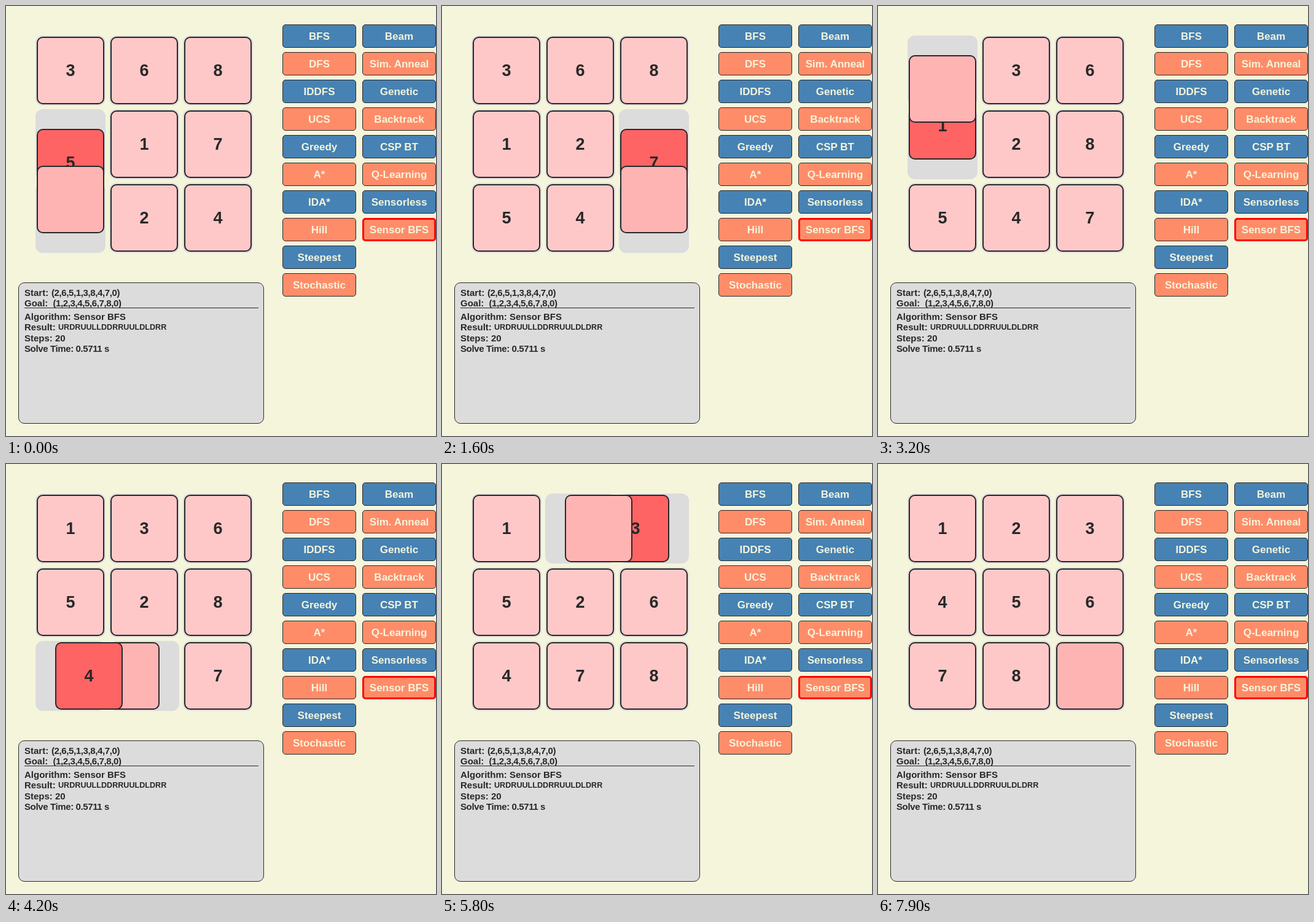
An HTML page for the animation above (8000 ms loop, 700 px wide and 700 px high).

```html
<!DOCTYPE html>
<html lang="en">
<head>
<meta charset="utf-8">
<title>Sliding puzzle solver</title>
<style>
  html, body { margin: 0; width: 100%; height: 100%; overflow: hidden; background: #f5f5dc; }
  svg { display: block; width: 100vw; height: 100vh; }
  text { font: bold 15px "Liberation Sans", Arial, sans-serif; fill: #282828; white-space: pre; }
  .slot { fill: #dcdcdc; }
  .panel { fill: #dcdcdc; stroke: #282828; }
  .tile rect { fill: #ffc8c8; stroke: #282828; stroke-width: 2; }
  .tile.moving rect { fill: #ff6464; }
  .tile.blank rect { fill: #ffb4b4; }
  .tile text { font-size: 27px; text-anchor: middle; }
  .button rect { fill: #4682b4; stroke: #282828; }
  .button.warm rect { fill: #ff8c69; }
  .button.active rect { stroke: #f00; stroke-width: 3; }
  .button text { font-size: 17px; text-anchor: middle; fill: #f5f5dc; }
  .tight { letter-spacing: -.38px; }
  .path { font-size: 12.6px; }
</style>
</head>
<body>
<svg viewBox="0 0 700 700">
  <g id="slots"></g>
  <g id="tiles"></g>
  <g id="buttons"></g>
  <rect class="panel" x="20.5" y="450.5" width="399" height="229" rx="9.5"/>
  <path d="M30 491.5H411" stroke="#282828"/>
  <text x="30" y="472">Start:</text>
  <text class="tight" x="74" y="472">(2,6,5,1,3,8,4,7,0)</text>
  <text x="30" y="489">Goal:</text>
  <text class="tight" x="76.5" y="489">(1,2,3,4,5,6,7,8,0)</text>
  <text x="30" y="511">Algorithm: Sensor BFS</text>
  <text x="30" y="528">Result:</text>
  <text class="path" x="85" y="527">URDRUULLDDRRUULDLDRR</text>
  <text x="30" y="546">Steps: 20</text>
  <text class="tight" x="30" y="563">Solve Time: 0.5711 s</text>
</svg>
<script>
const MOVES = "URDRUULLDDRRUULDLDRR";
const SHIFT = { U: -3, D: 3, L: -1, R: 1 };
const FRAME = 100, STEPS = 4;
const COLUMNS = [
  ["BFS", "DFS", "IDDFS", "UCS", "Greedy", "A*", "IDA*", "Hill", "Steepest", "Stochastic"],
  ["Beam", "Sim. Anneal", "Genetic", "Backtrack", "CSP BT", "Q-Learning", "Sensorless", "Sensor BFS"]
];

const byId = id => document.getElementById(id);

function add(parent, name, attrs, text) {
  const el = document.createElementNS("http://www.w3.org/2000/svg", name);
  for (const key in attrs) el.setAttribute(key, attrs[key]);
  if (text) el.textContent = text;
  parent.appendChild(el);
  return el;
}

function box(parent, x, y, width, height, rx, line = 0) {
  return add(parent, "rect", {
    x: x + line / 2, y: y + line / 2,
    width: width - line, height: height - line, rx: rx - line / 2
  });
}

const cellX = i => 50 + 120 * (i % 3);
const cellY = i => 50 + 120 * Math.floor(i / 3);

for (let i = 0; i < 9; i++) {
  box(byId("slots"), cellX(i) - 2, cellY(i) - 2, 114, 114, 12).setAttribute("class", "slot");
}

COLUMNS.forEach((names, col) => names.forEach((name, row) => {
  const active = name === "Sensor BFS";
  const x = 450 + 130 * col, y = 30 + 45 * row;
  const g = add(byId("buttons"), "g", {
    class: "button" + (row % 2 ? " warm" : "") + (active ? " active" : "")
  });
  box(g, x, y, 120, 38, 5, active ? 3 : 1);
  add(g, "text", { x: x + 60, y: y + 25 }, name);
}));

const layer = byId("tiles");
const tiles = Array.from({ length: 9 }, (_, n) => {
  const g = add(layer, "g", {});
  box(g, 0, 0, 110, 110, 10, 2);
  if (n) add(g, "text", { x: 55, y: 64 }, String(n));
  return g;
});

// boards[k] is the layout before move k
const boards = [[3, 6, 8, 5, 1, 7, 0, 2, 4]];
for (const move of MOVES) {
  const next = boards[boards.length - 1].slice();
  const from = next.indexOf(0), to = from + SHIFT[move];
  next[from] = next[to];
  next[to] = 0;
  boards.push(next);
}

function place(n, from, to, t) {
  const x = cellX(from) + (cellX(to) - cellX(from)) * t;
  const y = cellY(from) + (cellY(to) - cellY(from)) * t;
  tiles[n].setAttribute("transform", `translate(${x} ${y})`);
}

function draw(frame) {
  const k = Math.floor(frame / STEPS);
  const t = (frame % STEPS + 1) / STEPS;
  const board = boards[k], next = boards[k + 1];
  const moved = board[next.indexOf(0)];
  board.forEach((n, i) => {
    place(n, i, next.indexOf(n), t);
    const kind = n === 0 ? " blank" : n === moved && t < 1 ? " moving" : "";
    tiles[n].setAttribute("class", "tile" + kind);
  });
  const tileOnTop = MOVES[k] === "R" && t > 0.5;
  layer.append(...(tileOnTop ? [tiles[0], tiles[moved]] : [tiles[moved], tiles[0]]));
}

let shown = -1;
function tick() {
  const frame = Math.floor(performance.now() / FRAME) % (MOVES.length * STEPS);
  if (frame !== shown) draw(shown = frame);
  requestAnimationFrame(tick);
}
tick();
</script>
</body>
</html>
```
